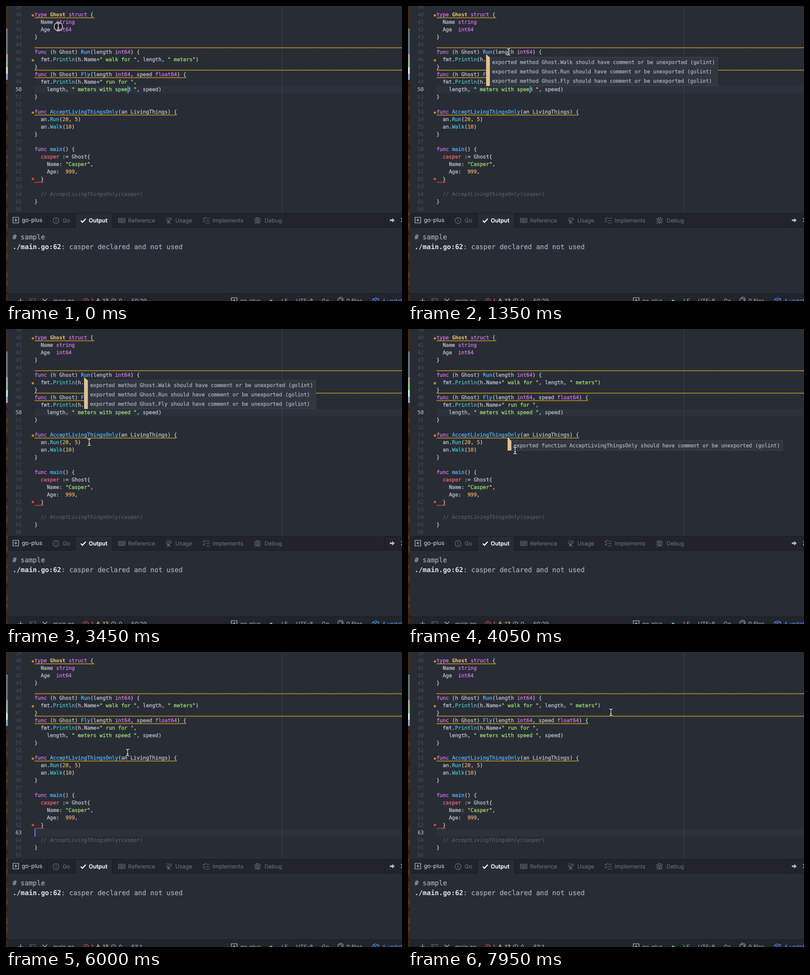
Recreate the animation shown at these times as an HTML page. Size 847 by 631 pixels, loop 8000 ms.

```html
<!DOCTYPE html>
<html lang="en">
<head>
<meta charset="utf-8">
<title>Editor lint hints</title>
<style>
html, body { margin: 0; width: 100%; height: 100%; overflow: hidden; background: #282c34; }
svg { display: block; width: 847px; height: 631px; }
text { white-space: pre; text-rendering: geometricPrecision; color: #bcc3d0; }
text, tspan { fill: currentColor; stroke: currentColor; stroke-width: 0; }
.code, .code tspan { stroke-width: .32px; }
.out, .out tspan { stroke-width: .25px; }
.ui { stroke-width: .12px; }
.code { font: 11px "DejaVu Sans Mono", monospace; }
.out { font: 14.4px "DejaVu Sans Mono", monospace; color: #9dadbf; }
.ui { font: 12px Inter, sans-serif; color: #9da5b4; }
.dim { color: #666d7a; }
.num { color: #464d5b; stroke-width: .1px; }
.num.on { color: #bcc3d0; }
.k { color: #d373ea; }
.f { color: #56b5fb; }
.c { color: #48c0cc; }
.s { color: #a0de78; }
.n { color: #e5a766; }
.t { color: #f2c87c; font-weight: bold; }
.r { color: #f5646f; }
.m { color: #5c6370; font-style: italic; }
.b { color: #e0e4ea; font-weight: bold; }
.code .t, .out .b { stroke-width: 0; }
.code .m { stroke-width: .1px; }
.line { fill: none; stroke: #9da5b4; stroke-width: 1.2; }
.gray { stroke: #666d7a; }
</style>
</head>
<body>
<svg id="stage" viewBox="0 0 847 631" xmlns="http://www.w3.org/2000/svg"></svg>
<script>
const LOOP = 8000, STEP = 150, CLICK = 5100, LEFT = 61;
const stage = document.getElementById('stage');
const rowTop = n => 11 + (n - 40) * 16;

// ‹xword› gives the word class x
const code = [
  '', '‹ktype› ‹tGhost› ‹kstruct› {', '  Name ‹kstring›', '  Age  ‹kint64›', '}', '',
  '‹kfunc› (h Ghost) ‹fRun›(length ‹kint64›) {',
  '  fmt.‹cPrintln›(h.Name+‹s" walk for "›, length, ‹s" meters"›)', '}',
  '‹kfunc› (h Ghost) ‹fFly›(length ‹kint64›, speed ‹kfloat64›) {',
  '  fmt.‹cPrintln›(h.Name+‹s" run for "›,',
  '    length, ‹s" meters with speed "›, speed)', '}', '',
  '‹kfunc› ‹fAcceptLivingThingsOnly›(an LivingThings) {',
  '  an.‹cRun›(‹n20›, ‹n5›)', '  an.‹cWalk›(‹n10›)', '}', '',
  '‹kfunc› ‹fmain›() {', '  ‹rcasper› := Ghost{', '    Name: ‹s"Casper"›,',
  '    Age:  ‹n999›,', '  }', '', '  ‹m// AcceptLivingThingsOnly(casper)›', '}', ''
];

const rect = (x, y, w, h, fill, more = '') =>
  `<rect x="${x}" y="${y}" width="${w}" height="${h}" fill="${fill}" ${more}/>`;
const text = (x, y, cls, s, more = '') =>
  `<text x="${x}" y="${y}" class="${cls}" ${more}>${s.replace(/‹(.)(.*?)›/g, '<tspan class="$1">$2</tspan>')}</text>`;
const path = (d, cls = 'line', more = '') => `<path d="${d}" class="${cls}" ${more}/>`;
const dot = (x, y, r, fill) => `<circle cx="${x}" cy="${y}" r="${r}" fill="${fill}"/>`;
const ring = (x, y, r, cls = 'line', more = '') =>
  `<circle cx="${x}" cy="${y}" r="${r}" class="${cls}" ${more}/>`;

function squiggle(row, to, color = '#cf9c26') {
  const n = Math.ceil((to - LEFT) / 4);
  const d = `M${LEFT} ${rowTop(row) + 15}` + 'l2 -1.6l2 1.6'.repeat(n);
  return path(d, 'line', `style="stroke:${color};stroke-width:1.1"`);
}

function hint(id, x, y, left, right, lines) {
  const h = lines.length * 20 + 2;
  return `<g id="${id}">` +
    rect(x + 8.5, y + 6.5, right - x - 9, h - 1, '#31363f', 'stroke="#3d434d"') +
    `<path d="M${x} ${y}L${x + 8} ${y + 7}V${y + 6 + h}H${x}z" fill="#e2c08d"/>` +
    lines.map((s, i) => text(left, y + 21 + i * 20, 'code', s, 'style="color:#a8b0be"')).join('') + '</g>';
}

function desktop() {
  const bands = [[0, 48, '#452a13'], [48, 55, '#5f7375'], [103, 14, '#b59a92'], [117, 14, '#7fbf87'],
    [131, 14, '#d3d8da'], [145, 13, '#88a3c4'], [158, 473, '#432710']];
  let s = bands.map(([y, h, c]) => rect(0, y, 4, h, c)).join('');
  for (let i = 0; i < 22; i++)
    s += rect(0, 168 + i * 21 + (i * 7) % 5, 4, 5 + (i * 5) % 8, i % 3 ? '#54341a' : '#341f0e');
  return s;
}

const plusBox = (x, y) => path(`M${x - 6} ${y - 6}h12v12h-12zM${x - 3.5} ${y}h7M${x} ${y - 3.5}v7`, 'line', 'style="stroke:#c3c9d4"');
const info = (x, y, r, cls) => ring(x, y, r, cls) + path(`M${x - 1} ${y - 1}h1v4M${x} ${y - 4}v1.5`, cls);

function panel() {
  const g = 'line gray';
  return rect(4, 443, 843, 31, '#21252b') + rect(149, 443, 78, 31, '#282c34') +
    path('M4 443.5H847M4 473.5H149M227 473.5H847M88.5 443V473M148.5 443V473M227.5 443V473M810.5 443V473', 'line', 'style="stroke:#181a1f;stroke-width:1"') +
    plusBox(21, 458) + text(34, 462, 'ui', 'go-plus', 'style="color:#c3c9d4"') +
    info(107, 459, 6.3, g) + text(121, 463, 'ui dim', 'Go') +
    path('M160 459l3.5 3.5l7 -7.5', 'line', 'style="stroke:#fff;stroke-width:2.3"') +
    text(177, 463, 'ui', 'Output', 'style="color:#fff;font-weight:600"') +
    path('M240.5 454h6.5l.5 1l.5 -1h6.5v9h-6.5l-.5 1l-.5 -1h-6.5zM247.5 455v8M242 456.5h4M242 458.7h4M242 461h4M249 456.5h4M249 458.7h4M249 461h4', g) +
    text(261, 463, 'ui dim', 'Reference') +
    path('M343 458l9 -5l2 3.5l-9 4.5zM348 459l-3 7M348 459l4 7M348 459v7M342 453l2 1M346 451l1 2', g) +
    text(362, 463, 'ui dim', 'Usage') +
    path('M421 454l2 2l4 -5M428 454h8M421 460l2 2l3 -4M428 459h8M427 464h9', g) +
    text(442, 463, 'ui dim', 'Implements') +
    path('M535 456h6v6l-3 3l-3 -3zM535.5 455a2.5 2.5 0 0 1 5 0M538 456v8M534 457l-3 -3M542 457l3 -3M535 460h-5M541 460h5M535 462l-3 4M541 462l3 4M535 452l1 1M541 452l-1 1', g) +
    text(553, 463, 'ui dim', 'Debug') +
    `<path d="M821 456.5h5v-3l5.5 4.7l-5.5 4.7v-3h-5z" fill="#b4bbc8"/>` +
    path('M845 454l8 8M845 462l8 -8', 'line', 'style="stroke:#b4bbc8;stroke-width:1.5"') +
    text(14, 499, 'out', '# sample') +
    text(14, 520, 'out', '‹b./main.go:62›: casper declared and not used');
}

function statusBar() {
  const y = 634.5;
  const word = (x, s, color = '#9da5b4') => text(x, y, 'ui', s, `style="color:${color}"`);
  return rect(4, 615, 843, 16, '#21252b') + rect(4, 615, 843, 1, '#181a1f') +
    path('M25 631h12M31 625.5v11M78 626l10 10M88 626l-10 10', 'line', 'style="stroke-width:1.7"') +
    path('M51 626h12v10h-12zM53 628l2.5 2.5', 'line gray') +
    word(101, 'main.go') +
    ring(171, 631, 5.5, 'line', 'style="stroke:#f0543c"') + path('M171 627.5v4', 'line', 'style="stroke:#f0543c"') +
    word(182, '1', '#f0543c') +
    path('M197 626l5 9h-10zM197 629v3', 'line', 'style="stroke:#e2c08d"') +
    word(207, '13', '#e2c08d') + info(230, 631, 5, 'line') + word(241, '0') +
    `<text id="place" x="268" y="${y}" class="ui"></text>` +
    plusBox(488, 630) + word(501, 'go-plus') + dot(567, 631, 3, '#4fc07a') +
    word(589, 'LF') + word(620, 'UTF-8') + word(675, 'Go') +
    path('M710 626h7l2 2v9h-9zM713 626v-3h5l3 3v8') + word(728, '0 files') +
    path('M784 627l6 -2.5l7 2v9M784 627v8M784 627l6 2l7 -2.5M790 629v6', 'line', 'style="stroke:#528bff"') +
    word(804, '4 updates', '#528bff');
}

const tail = 'should have comment or be unexported (golint)';
stage.innerHTML = rect(0, 0, 847, 631, '#282c34') + desktop() +
  rect(LEFT, 0, 786, 16, '#2b323b', 'id="band"') +
  rect(590, 0, 1, 443, '#3b4049') +
  code.map((s, i) => {
    const y = rowTop(39 + i) + 11;
    return text(20.5, y, 'code num', String(39 + i), `id="row${39 + i}"`) + text(LEFT, y, 'code', s);
  }).join('') +
  squiggle(40, 187) + squiggle(44, 847) + squiggle(47, 847) + squiggle(48, 384) + squiggle(53, 365) +
  squiggle(62, 81, '#d8433c') +
  [20, 116, 228].map(y => dot(57.5, y, 2.6, '#b58a25')).join('') + dot(57.5, 370, 2.7, '#d8433c') +
  rect(0, 0, 2, 16, '#528bff', 'id="caret"') +
  panel() + statusBar() +
  hint('methods', 167, 103, 180, 663, ['Walk', 'Run', 'Fly'].map(m => `exported method Ghost.${m} ${tail}`)) +
  hint('func', 213, 232, 226, 802, [`exported function AcceptLivingThingsOnly ${tail}`]) +
  `<g id="mouse"><circle id="press" r="9" fill="#15171b" fill-opacity=".55" stroke="#f2f2f2" stroke-width="1.3"/>` +
  ['#111;stroke-width:2.6', '#fff;stroke-width:1.2'].map(c =>
    path('M-3.5 -7.2Q-.5 -7 0 -5Q.5 -7 3.5 -7.2M0 -5V5M-3.5 7.2Q-.5 7 0 5Q.5 7 3.5 7.2M-2 2.5h4', 'line', `style="stroke:${c}"`)).join('') + '</g>';

// pointer stops: time, x, y
const route = [
  [0, 112, 44], [150, 93, 21], [300, 104, 40], [600, 146, 86], [750, 163, 96], [900, 168, 98],
  [1200, 190, 99], [1350, 215, 98], [1500, 224, 100], [1950, 158, 94], [2100, 166, 96],
  [2400, 204, 112], [2850, 279, 171], [3000, 285, 181], [3150, 285, 181], [3300, 228, 220],
  [3450, 178, 242], [3600, 212, 228], [3750, 214, 230], [4050, 229, 260], [4200, 121, 329],
  [4500, 118, 360], [4950, 117, 380], [5250, 118, 386], [5700, 118, 386], [5850, 205, 285],
  [6000, 260, 215], [6150, 260, 215], [6300, 410, 25], [6450, 441, 73], [7350, 441, 73],
  [7500, 482, 108], [7650, 434, 129], [8000, 434, 129]
];

function pointerAt(t) {
  const i = Math.max(1, route.findIndex(p => p[0] >= t));
  const [a, b] = [route[i - 1], route[i]];
  const u = (t - a[0]) / (b[0] - a[0]);
  return [a[1] + (b[1] - a[1]) * u, a[2] + (b[2] - a[2]) * u];
}

const el = id => document.getElementById(id);
const show = (id, on) => el(id).setAttribute('visibility', on ? 'visible' : 'hidden');

function draw(t) {
  const clicked = t >= CLICK, row = clicked ? 63 : 50;
  const lit = clicked ? (t - CLICK) % 800 < 400 : (t + 370) % 800 < 400;
  const [x, y] = pointerAt(t);
  el('mouse').setAttribute('transform', `translate(${x} ${y})`);
  show('press', t < STEP);
  show('methods', t >= 1050 && t < 3600);
  show('func', t >= 3600 && t < 4200);
  show('caret', lit);
  el('caret').setAttribute('x', clicked ? LEFT : 260);
  el('caret').setAttribute('y', rowTop(row));
  el('band').setAttribute('y', rowTop(row));
  el('row50').classList.toggle('on', !clicked);
  el('row63').classList.toggle('on', clicked);
  el('place').textContent = clicked ? '63:1' : '50:29';
}

const start = performance.now();
let last = -1;
function tick() {
  const t = Math.floor((performance.now() - start) % LOOP / STEP) * STEP;
  if (t !== last) draw(last = t);
  requestAnimationFrame(tick);
}
tick();
</script>
</body>
</html>
```
